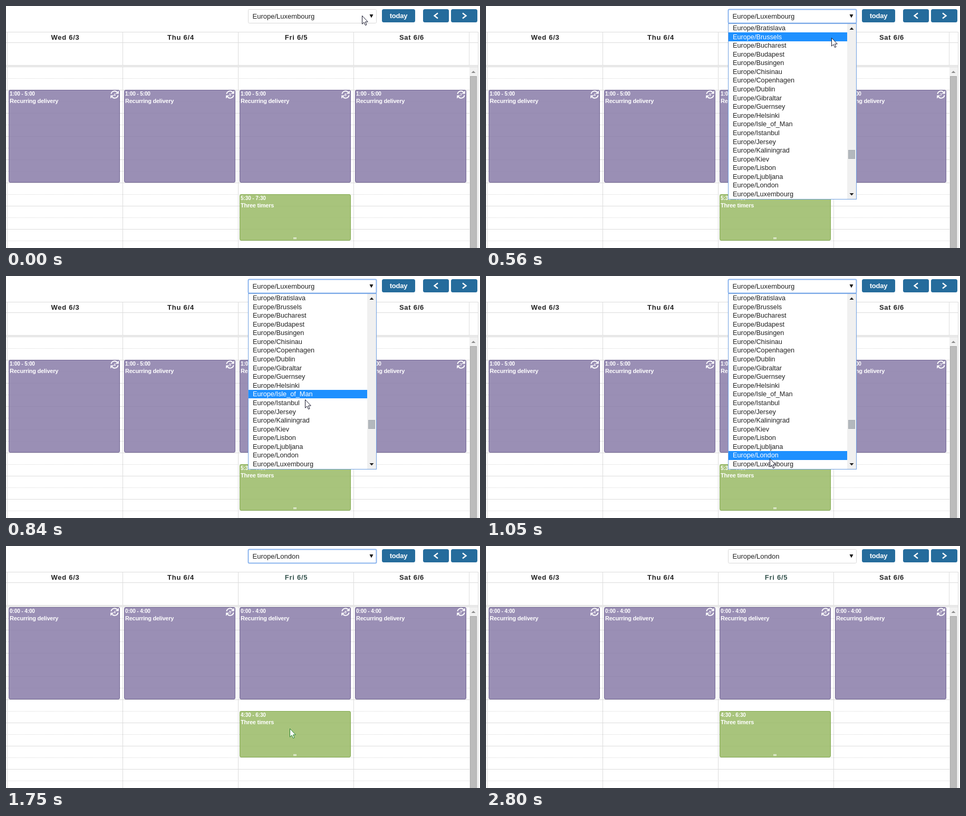
An HTML page for the animation above (2870 ms loop, 899 by 459 pixels).

```html
<!DOCTYPE html>
<html lang="en">
<head>
<meta charset="utf-8">
<title>Calendar time zone</title>
<style>
  html, body { margin: 0; width: 100%; height: 100%; overflow: hidden; background: #fff; }
  svg { display: block; width: 899px; height: 459px; font-family: "Liberation Sans", Arial, sans-serif; }
  text { white-space: pre; }
  .field { font-size: 13px; fill: #222; }
  .item { font-size: 12.7px; fill: #222; }
  .head { font-size: 13px; font-weight: bold; letter-spacing: .75px; text-anchor: middle; }
  .time { font-size: 10px; font-weight: bold; letter-spacing: -.1px; fill: #fff; }
  .title { font-size: 11px; font-weight: bold; letter-spacing: -.25px; fill: #fff; }
  .today { font-size: 13px; font-weight: bold; letter-spacing: -.2px; fill: #fff; text-anchor: middle; }
  .day { font-size: 7px; font-weight: bold; fill: #fff; text-anchor: middle; }
</style>
</head>
<body>
<svg id="stage" viewBox="0 0 899 459"></svg>
<script>
const LOOP = 2870, STEP = 70;
const stage = document.getElementById('stage');

function add(parent, tag, attrs = {}, text) {
  const node = document.createElementNS('http://www.w3.org/2000/svg', tag);
  set(node, attrs);
  if (text !== undefined) node.textContent = text;
  parent.appendChild(node);
  return node;
}
function set(node, attrs) {
  for (const key in attrs) node.setAttribute(key, attrs[key]);
}
function show(node, visible) {
  node.style.display = visible ? '' : 'none';
}
const rect = (parent, x, y, width, height, fill, more = {}) =>
  add(parent, 'rect', { x, y, width, height, fill, ...more });
const label = (parent, cls, x, y, text, more = {}) =>
  add(parent, 'text', { class: cls, x, y, ...more }, text);
const path = (parent, d, more = {}) => add(parent, 'path', { d, ...more });

const columns = [2, 221, 440, 659];
const GRID = '#dcdcdc';

// Calendar grid
for (let y = 137, i = 0; y < 459; y += 22, i++) {
  if (i % 2) rect(stage, 0, y, 879, 1, GRID);
  else path(stage, `M0 ${y + .5}H879`, { stroke: '#d8d8d8', 'stroke-dasharray': '1 1' });
}
for (const y of [49, 69]) rect(stage, 0, y, 896, 1, GRID);
rect(stage, 0, 112, 896, 4, '#eeeeee');
for (const y of [112, 115]) rect(stage, 0, y, 896, 1, GRID);
for (const x of columns) {
  rect(stage, x, 49, 1, 63, GRID);
  rect(stage, x, 116, 1, 343, GRID);
}
rect(stage, 878, 49, 1, 64, GRID);
rect(stage, 895, 49, 1, 410, GRID);
const heads = ['Wed 6/3', 'Thu 6/4', 'Fri 6/5', 'Sat 6/6'].map((name, i) =>
  label(stage, 'head', columns[i] + 110.5, 64, name, { fill: '#222' }));

// Page scrollbar
rect(stage, 879, 116, 16, 343, '#f1f1f1');
rect(stage, 880.5, 133.5, 12, 340, '#bcbcbc', { stroke: '#a8a8a8' });
path(stage, 'M882.5 127h8l-4-4z', { fill: '#8c8c8c' });

// Toolbar
const BLUE = '#256c9c';
for (const [x, w] of [[713, 63], [791, 49], [844, 50]]) rect(stage, x, 6, w, 25, BLUE, { rx: 3.5 });
label(stage, 'today', 744.5, 23, 'today');
const chevron = { fill: 'none', stroke: '#fff', 'stroke-width': 2.4 };
path(stage, 'M819 13.5L812.5 18.5L819 23.5', chevron);
path(stage, 'M866 13.5L872.5 18.5L866 23.5', chevron);

// Events
function makeEvent(x, title, fill, stroke) {
  const group = add(stage, 'g');
  const box = rect(group, x + 3.5, .5, 210, 10, fill, { 'fill-opacity': .85, stroke, rx: 2.5 });
  const time = label(group, 'time', x + 5, 11, '');
  label(group, 'title', x + 5, 25, title);
  return { group, box, time };
}
function placeEvent(event, y, height, time) {
  set(event.group, { transform: `translate(0 ${y})` });
  set(event.box, { height: height - 1 });
  event.time.textContent = time;
}
const deliveries = columns.map((x, i) => {
  const event = makeEvent(x, 'Recurring delivery', '#897ca8', '#716593');
  const icon = add(event.group, 'g', { transform: `translate(${x + 204} 9)` });
  for (const turn of [0, 180]) {
    const half = add(icon, 'g', { transform: `rotate(${turn})` });
    path(half, 'M-6.6 -1.2A6.7 6.7 0 0 1 4.6 -4.8', { fill: 'none', stroke: '#fff', 'stroke-width': 1.9 });
    path(half, 'M7.8 -7.6V-1.4H1.6z', { fill: '#fff' });
  }
  label(icon, 'day', 0, 2.6, i + 4);
  return event;
});
const timers = makeEvent(440, 'Three timers', '#99ba66', '#82a94f');
const grip = path(timers.group, 'M545 82.5h6M545 84.5h6', { stroke: '#fff' });

// Select box
const selectBox = rect(stage, 459.5, 6.5, 243, 26, '#fff', { rx: 2 });
const zone = label(stage, 'field', 467.5, 24, '');
path(stage, 'M689.5 16h7l-3.5 6.5z', { fill: '#111' });

// Drop-down list
const cities = ('Bratislava Brussels Bucharest Budapest Busingen Chisinau Copenhagen Dublin Gibraltar ' +
  'Guernsey Helsinki Isle_of_Man Istanbul Jersey Kaliningrad Kiev Lisbon Ljubljana London Luxembourg').split(' ');
const LIST_TOP = 33.5, ROW = 16.58;
const list = add(stage, 'g');
rect(list, 459.5, 33.5, 243, 333, '#fff', { stroke: '#6f9fe0' });
const marker = rect(list, 460, 0, 225, 17, '#1e90ff');
const items = cities.map((city, i) =>
  label(list, 'item', 468, Math.round(LIST_TOP + ROW * (i + .5) + 4.2), 'Europe/' + city));
rect(list, 685, 34, 17, 332, '#f0f0f0');
rect(list, 687.5, 273.5, 12, 16, '#b3b8bd', { stroke: '#a9aeb3' });
path(list, 'M689.5 45h8l-4-4.5z', { fill: '#222' });
path(list, 'M689.5 355h8l-4 4.5z', { fill: '#222' });

// Pointers, both with the hot spot at 0,0
const pointer = add(stage, 'g');
const arrow = path(pointer, 'M.5 .5V16.2L4 12.9L6.6 18.6L9 17.5L6.5 12H11.3z', { fill: '#fff' });
const hand = path(pointer,
  'M-1 1.5Q.5 -.3 2 1.5V7Q4 6 5 7.6Q7 6.8 8 8.4Q10.5 8 10.5 10.5V14.5L8.5 20.5H0L-4 13.5' +
  'Q-4 10.8 -1 12.5z', { fill: '#fff', stroke: '#111' });

const downPath = [[655, 60], [628, 108], [598, 153], [582, 191], [567, 234], [554, 278], [544, 318], [538, 346]];
const exitPath = [[564, 359], [638, 398], [742, 445]];

function pointerAt(t) {
  if (t < 560) return [675, 18];
  if (t < 2030) return downPath[Math.min(7, Math.floor((t - 560) / STEP))];
  return exitPath[Math.floor((t - 2030) / STEP)];
}

function render(t) {
  const open = t >= 420 && t < 1400;
  const moved = t >= 1400;
  const focused = t >= 420 && t < 2800;
  const loaded = t < 1400 || t >= 1750;

  set(selectBox, { stroke: focused ? '#8ab4ee' : '#d9d9d9', 'stroke-width': focused ? 2 : 1 });
  zone.textContent = 'Europe/' + (moved ? 'London' : 'Luxembourg');
  set(heads[2], { fill: moved ? '#34524d' : '#222' });

  for (const event of [...deliveries, timers]) show(event.group, loaded);
  for (const event of deliveries) {
    placeEvent(event, moved ? 116 : 159, moved ? 175 : 176, moved ? '0:00 - 4:00' : '1:00 - 5:00');
  }
  placeEvent(timers, moved ? 313 : 357, 88, moved ? '4:30 - 6:30' : '5:30 - 7:30');

  const spot = pointerAt(t);
  show(pointer, !!spot);
  if (spot) {
    const onEvent = t >= 1820 && spot[0] < 654 && spot[1] < 401;
    set(pointer, { transform: `translate(${spot})` });
    show(arrow, !onEvent);
    show(hand, onEvent);
    set(arrow, { stroke: t >= 1750 && t < 1820 ? '#23802f' : '#15152a' });
  }

  show(list, open);
  if (open) {
    const hovered = t < 560 ? 19 : Math.floor((spot[1] - 4 - LIST_TOP) / ROW);
    const top = Math.round(LIST_TOP + ROW * hovered);
    set(marker, { y: top, height: Math.round(LIST_TOP + ROW * (hovered + 1)) - top });
    items.forEach((item, i) => { item.style.fill = i === hovered ? '#fff' : ''; });
  }
}

const start = performance.now();
function tick(now) {
  render(Math.max(0, now - start) % LOOP);
  requestAnimationFrame(tick);
}
render(0);
requestAnimationFrame(tick);
</script>
</body>
</html>
```
